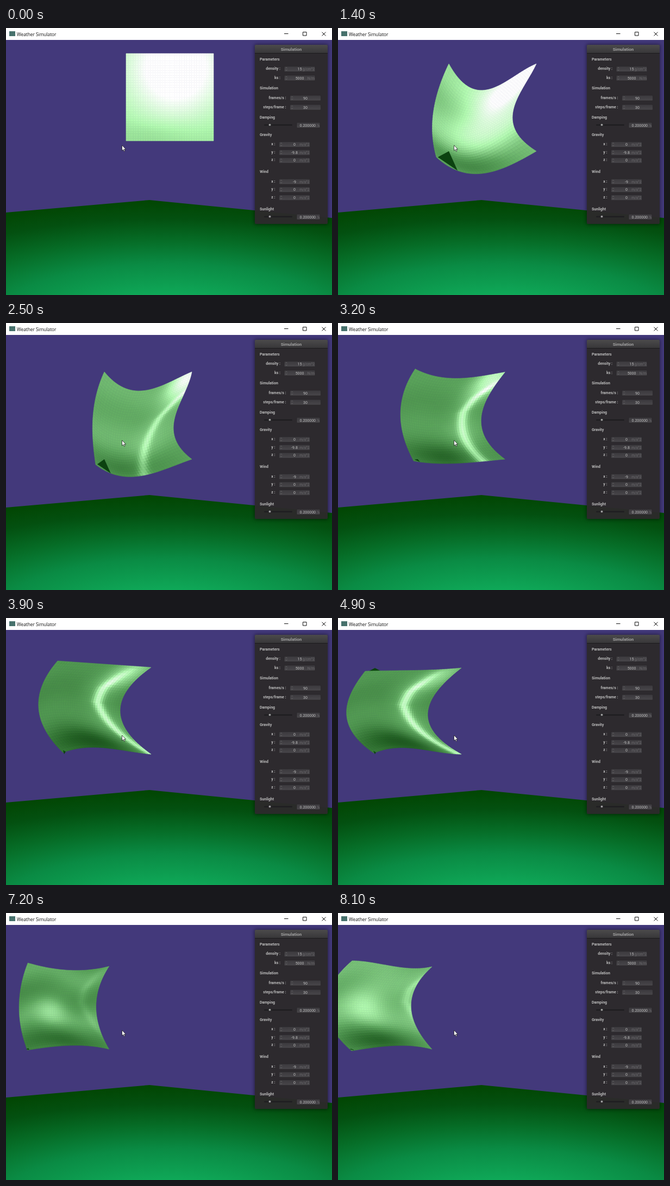
Animation of 600 by 492 pixels, one loop 8.2 s. Source, as an HTML page with a canvas:

```html
<!DOCTYPE html>
<html lang="en">
<head>
<meta charset="utf-8">
<title>Weather Simulator</title>
<style>
html, body { margin: 0; width: 100%; height: 100%; overflow: hidden; background: #43397b; }
#stage { position: relative; width: 600px; height: 492px; overflow: hidden; background: #43397b; }
#ground {
  position: absolute; inset: 0;
  clip-path: polygon(0 340px, 264px 317px, 600px 350px, 600px 492px, 0 492px);
  background: radial-gradient(ellipse 700px 230px at 300px 540px,
    #10b060 0, #0fa858 21%, #0a8b44 46%, #066c26 65%, #035010 82%, #024603 96%);
}
canvas, svg { position: absolute; left: 0; top: 0; }
#panel {
  position: absolute; left: 458px; top: 31px; width: 134px; height: 330px;
  border-radius: 2px; background: rgba(44, 42, 43, .96); box-shadow: 0 0 6px 1px rgba(0, 0, 0, .45);
}
#panel::before {
  content: ""; position: absolute; left: 0; top: 0; width: 100%; height: 16px;
  border-radius: 2px 2px 0 0; background: linear-gradient(#4b4a4b, #383739);
  border-bottom: 1px solid #1c1b1d; box-sizing: border-box;
}
text { font: 7px Roboto, sans-serif; fill: #bdbdbd; dominant-baseline: central; }
.bold { font-weight: 700; }
.head { font-size: 8px; fill: #a3a3a3; }
.unit { fill: #6b6a6d; font-size: 6.6px; }
.title { font: 8.3px "Open Sans", sans-serif; fill: #111; }
</style>
</head>
<body>
<div id="stage">
  <div id="ground"></div>
  <canvas id="view" width="600" height="492"></canvas>
  <div id="panel"></div>
  <svg id="ui" width="600" height="492">
    <defs>
      <linearGradient id="box" x2="0" y2="1">
        <stop stop-color="#3b393d"/><stop offset="1" stop-color="#48464a"/>
      </linearGradient>
    </defs>
    <rect width="600" height="22" fill="#fff"/>
    <rect x="6" y="6" width="11" height="9" fill="#47716c"/>
    <text class="title" x="20" y="11">Weather Simulator</text>
    <path d="M512 10.5h7.5M546.5 7.5h6.5v6.5h-6.5zM581.5 7.5l7 7m0-7l-7 7" fill="none" stroke="#111"/>
  </svg>
</div>
<script>
const LOOP = 8200, STEP = 100, CELLS = 36, SIZE = 161, FLOOR = 251;

// pin: upper right corner of the square that holds the cloth
// tl, bl: how far the left corners billow away from that square
// top, right, bottom, left: inward bow of each edge near its two ends
const shapes = [
  { at: 0, pin: [382, 47] },
  { at: 1400, pin: [365, 66], bl: [-23, 11], top: [98, 22], right: [25, 85], bottom: [-60, -32], left: [-20, -24] },
  { at: 2500, pin: [342, 90], bl: [-16, 10], top: [66, 23], right: [10, 71], bottom: [-49, -17], left: [-21, -14] },
  { at: 3900, pin: [267, 91], tl: [-12, -12], bl: [-2, -3], right: [76, 76], bottom: [22, 4], left: [-52, -55] },
  { at: 4900, pin: [227, 92], tl: [-18, 6], bl: [-2, -2], top: [0, 4], right: [68, 96], bottom: [24, 0], left: [-45, -68] },
  { at: 6000, pin: [211, 97], top: [26, 15], right: [13, 17], bottom: [9, 11], left: [17, 17] },
  { at: 8100, pin: [173, 99], tl: [5, -11], bl: [4, 3], top: [-3, 15], right: [57, 46], bottom: [7, 14], left: [-64, -64] }
].map(s => ({ tl: [0, 0], bl: [0, 0], top: [0, 0], right: [0, 0], bottom: [0, 0], left: [0, 0], ...s }));

// tone: base, shade along the hem, waves
// glow: u, v, radius, strength; ridge: u, lean, strength
const lights = [
  { at: 0, tone: [.67, .06, 0], glow: [.57, .17, .62, .45], ridge: [.87, -1, 0] },
  { at: 1400, tone: [.61, .2, .04], glow: [.8, .2, .5, .45], ridge: [.87, -1, 0] },
  { at: 2500, tone: [.54, .17, .02], glow: [.95, .06, .2, .42], ridge: [.87, -1, .25] },
  { at: 3900, tone: [.43, .2, .02], glow: [.85, .03, .2, .22], ridge: [.72, 0, .4] },
  { at: 4900, tone: [.44, .2, .02], glow: [.87, .05, .2, .17], ridge: [.69, 0, .4] },
  { at: 6000, tone: [.4, 0, .08], glow: [.37, .58, .18, .15], ridge: [.69, 0, 0] },
  { at: 8100, tone: [.55, .26, .03], glow: [.47, .48, .25, .18], ridge: [.95, 0, .15] }
];
const ramp = [[0, 34, 0], [35, 98, 35], [92, 165, 92], [178, 250, 176], [255, 255, 255]];

const lerp = (a, b, k) => a + (b - a) * k;
const bell = x => Math.exp(-x * x);
const clamp = (x, hi) => Math.min(hi, Math.max(0, x));

// Monotone cubic through one value of every key.
function curve(keys, get, t) {
  const end = keys.length - 1;
  let i = 0;
  while (i < end - 1 && t >= keys[i + 1].at) i++;
  const slope = j => (get(keys[j + 1]) - get(keys[j])) / (keys[j + 1].at - keys[j].at);
  const tangent = j => {
    if (j === 0 || j === end) return slope(Math.min(j, end - 1));
    const a = slope(j - 1), b = slope(j);
    return a * b > 0 ? 2 * a * b / (a + b) : 0;
  };
  const h = keys[i + 1].at - keys[i].at, k = (t - keys[i].at) / h, k2 = k * k, k3 = k2 * k;
  return get(keys[i]) * (2 * k3 - 3 * k2 + 1) + get(keys[i + 1]) * (3 * k2 - 2 * k3)
    + h * (tangent(i) * (k3 - 2 * k2 + k) + tangent(i + 1) * (k3 - k2));
}

function stateAt(keys, t) {
  const out = {};
  for (const name in keys[0])
    if (name !== 'at') out[name] = keys[0][name].map((_, n) => curve(keys, k => k[name][n], t));
  return out;
}

const bow = ([a, b], k) => 3 * k * (1 - k) * (a * (1 - k) + b * k);

// Maps u, v in 0..1 to the stage: bilinear square plus the bowed edges.
function clothMap(s) {
  const [x, y] = s.pin, size = Math.min(SIZE, FLOOR - y);
  const pins = { tl: [x - size, y], bl: [x - size, y + size] };
  const tl = pins.tl.map((p, n) => p + s.tl[n]), bl = pins.bl.map((p, n) => p + s.bl[n]);
  const at = (u, v) => [
    lerp(lerp(tl[0], x, u), lerp(bl[0], x, u), v) + (1 - u) * bow(s.left, v) - u * bow(s.right, v),
    lerp(lerp(tl[1], y, u), lerp(bl[1], y + size, u), v) + (1 - v) * bow(s.top, u) - v * bow(s.bottom, u)
  ];
  return { at, pins };
}

function brightness(u, v, { tone, glow, ridge }) {
  const crest = ridge[0] + ridge[1] * (v - .35) + .5 * Math.max(0, Math.abs(v - .35) - .08);
  const off = u - crest;
  return tone[0]
    - tone[1] * bell((v - .93) / .17) * bell((u - .4) / .45)
    + tone[2] * Math.cos(11 * (v - .58) + .8 * Math.sin(6 * u) - .6)
    + glow[3] * bell(Math.hypot(u - glow[0], v - glow[1]) / glow[2])
    + ridge[2] * (.75 * bell(off / .06) + .25 * bell(off / .2)) * clamp(v * 5, 1);
}

function colour(s) {
  s = clamp(s, .9999) * 4;
  const n = Math.floor(s);
  return `rgb(${ramp[n].map((c, i) => Math.round(lerp(c, ramp[n + 1][i], s - n)))})`;
}

const ctx = document.getElementById('view').getContext('2d');

function fill(points, style, seam) {
  ctx.beginPath();
  points.forEach(p => ctx.lineTo(p[0], p[1]));
  ctx.closePath();
  ctx.fillStyle = ctx.strokeStyle = style;
  ctx.fill();
  if (seam) ctx.stroke();
}

// Back side of the cloth between a pinned corner and its billowing edge.
function fold(pin, at, v) {
  const tip = at(0, v), reach = Math.hypot(pin[0] - tip[0], pin[1] - tip[1]) / 120;
  fill([pin, at(.02, lerp(v, .5, .04)), at(reach, v)], '#0c4210');
}

function draw(t) {
  const { at, pins } = clothMap(stateAt(shapes, t)), light = stateAt(lights, t);
  ctx.clearRect(0, 0, 600, 492);
  ctx.lineWidth = .6;
  fold(pins.tl, at, 0);
  for (let j = 0; j < CELLS; j++) for (let i = 0; i < CELLS; i++) {
    const u = i / CELLS, v = j / CELLS, d = 1 / CELLS;
    fill([at(u, v), at(u + d, v), at(u + d, v + d), at(u, v + d)],
      colour(brightness(u + d / 2, v + d / 2, light)), true);
  }
  fold(pins.bl, at, 1);
}

// Control panel
const ui = document.getElementById('ui');
function add(tag, attrs, text) {
  const el = document.createElementNS(ui.namespaceURI, tag);
  for (const n in attrs) el.setAttribute(n, attrs[n]);
  if (text) el.textContent = text;
  ui.append(el);
}
const label = (text, x, y, cls = '', anchor = 'start') =>
  add('text', { x, y, class: cls, 'text-anchor': anchor }, text);
const box = (x, y, w) =>
  add('rect', { x, y: y - 5, width: w, height: 10, rx: 1.5, fill: 'url(#box)', stroke: '#262428', 'stroke-width': .6 });

function field(name, value, unit, x, y) {
  label(name + ' :', x - 7, y - .5, 'bold', 'end');
  box(x, y, 57);
  add('path', { d: `M${x + 2.5} ${y - 1.3}l1.5-1.5 1.5 1.5m-3 2.6l1.5 1.5 1.5-1.5`,
    fill: 'none', stroke: '#777', 'stroke-width': .7 });
  label(value, x + 28.5, y + .5, '', 'middle');
  if (unit) label(unit, x + 56, y + .5, 'unit', 'end');
}
function slider(y) {
  add('rect', { x: 475, y: y - 1.5, width: 52, height: 2.5, rx: 1.2, fill: '#1f1e21' });
  add('circle', { cx: 485.5, cy: y - .5, r: 3, fill: '#4a494c', stroke: '#1b1a1c', 'stroke-width': .7 });
  add('circle', { cx: 485.5, cy: y - .5, r: 1.4, fill: '#b5b5b5' });
  box(535, y, 43);
  label('0.200000', 570, y + .5, '', 'end');
  label('%', 577, y + .5, 'unit', 'end');
}
const vector = (values, y) =>
  values.forEach((v, n) => field('xyz'[n], v, 'm/s^2', 502.5, y + n * 14.7));

label('Simulation', 525, 39.5, 'bold head', 'middle');
[['Parameters', 58], ['Simulation', 111], ['Damping', 165], ['Gravity', 197], ['Wind', 265], ['Sunlight', 333.5]]
  .forEach(([s, y]) => label(s, 467, y, 'bold'));
field('density', '15', 'g/cm^2', 512, 75.5);
field('ks', '5000', 'N/m', 512, 92);
field('frames/s', '90', '', 522.5, 129);
field('steps/frame', '30', '', 522.5, 146);
slider(179);
vector(['0', '-9.8', '0'], 214.5);
vector(['-9', '0', '0'], 283);
slider(348);
add('path', { d: 'M213.5 216v10l2.3-2.1 1.6 3.6 1.5-.7-1.5-3.4h3.1z',
  fill: '#fff', stroke: '#111', 'stroke-width': .7 });

let shown = -1;
function tick() {
  const t = Math.floor(performance.now() % LOOP / STEP) * STEP;
  if (t !== shown) draw(shown = t);
  requestAnimationFrame(tick);
}
tick();
</script>
</body>
</html>
```
